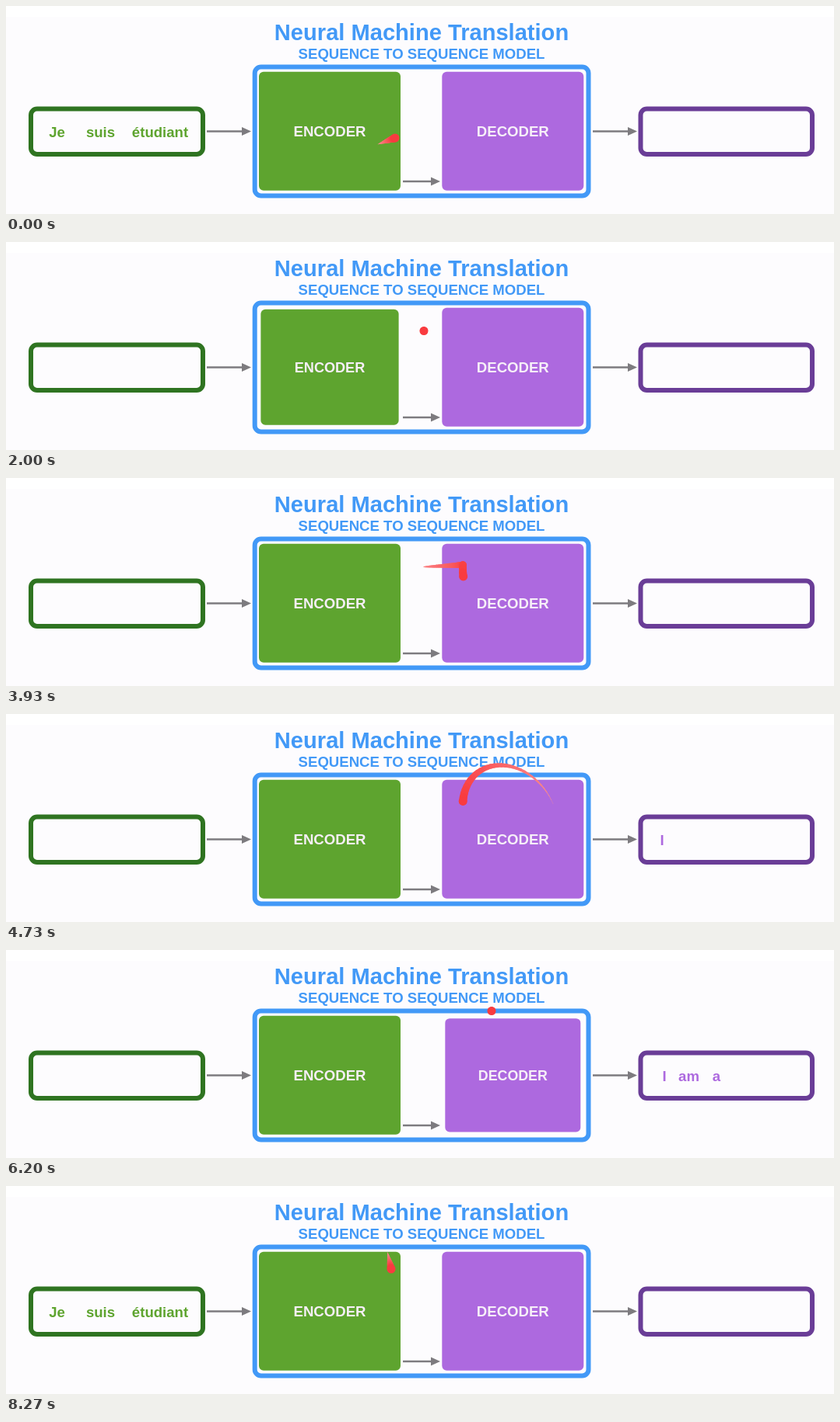
An HTML page with a canvas for the animation above (8340 ms loop, 1064 by 268 pixels).

```html
<!DOCTYPE html>
<html lang="en">
<head>
<meta charset="utf-8">
<title>Sequence to sequence model</title>
<style>
  html, body { margin: 0; width: 100%; height: 100%; overflow: hidden; background: #fff; }
  canvas { display: block; }
</style>
</head>
<body>
<canvas id="stage" width="1064" height="268"></canvas>
<script>
const ctx = document.getElementById('stage').getContext('2d');
const LOOP = 8340;
const BLUE = '#4299f7', GREEN = '#5ea42f', DARK_GREEN = '#2f7421';
const PURPLE = '#ad69df', DARK_PURPLE = '#6a3d97', ORANGE = '#f98a26', RED = '#f93b3f';

const clamp = v => Math.min(1, Math.max(0, v));
const progress = (t, start, length) => clamp((t - start) / length);
const mix = (a, b, p) => a + (b - a) * p;
const smooth = p => p * p * (3 - 2 * p);
const easeOut = p => 1 - (1 - p) ** 2;

function roundRect(x, y, w, h, r) {
  ctx.beginPath();
  ctx.roundRect(x, y, w, h, r);
}

function text(label, x, baseline, color, size = 18.6) {
  ctx.font = `bold ${size}px "Liberation Sans", Arial, sans-serif`;
  ctx.textAlign = 'center';
  ctx.fillStyle = color;
  ctx.fillText(label, x, baseline);
}

function frameBox(x, y, w, h, color) {
  roundRect(x, y, w, h, 8);
  ctx.strokeStyle = color;
  ctx.lineWidth = 6;
  ctx.stroke();
}

function arrow(x1, x2, y) {
  ctx.strokeStyle = ctx.fillStyle = '#7d7b7f';
  ctx.lineWidth = 2.6;
  ctx.beginPath();
  ctx.moveTo(x1, y);
  ctx.lineTo(x2 - 10, y);
  ctx.stroke();
  ctx.beginPath();
  ctx.moveTo(x2, y);
  ctx.lineTo(x2 - 12, y - 5.5);
  ctx.lineTo(x2 - 12, y + 5.5);
  ctx.fill();
}

// Scale of a block that shrinks briefly and recovers.
const pulse = (t, middle, half) =>
  1 - 0.044 * Math.cos(clamp(Math.abs(t - middle) / half) * Math.PI / 2) ** 2;

function block(label, centerX, color, scale) {
  ctx.save();
  ctx.translate(centerX, 161.3);
  ctx.scale(scale, scale);
  roundRect(-91, -76.5, 182, 153, 6);
  ctx.fillStyle = color;
  ctx.fill();
  text(label, 0, 6.5, '#f6eff8');
  ctx.restore();
}

function contextCard(t) {
  if (t < 2600 || t > 3600) return;
  const x = mix(486, 533.7, smooth(progress(t, 2600, 330))) + 60 * smooth(progress(t, 3200, 400));
  ctx.save();
  ctx.translate(x, 144);
  roundRect(-19.5, -59, 39, 118, 6);
  ctx.fillStyle = ORANGE;
  ctx.fill();
  ctx.rotate(Math.PI / 2);
  text('CONTEXT', 0, 6.5, '#fdeee0');
  ctx.restore();
}

function clipped(x, w, draw) {
  ctx.save();
  ctx.beginPath();
  ctx.rect(x, 130, w, 64);
  ctx.clip();
  draw();
  ctx.restore();
}

function inputWords(t) {
  const time = t >= 7470 ? 0 : t;
  [['Je', 65.5], ['suis', 121.5], ['étudiant', 198]].forEach(([word, x], i) => {
    const p = progress(time, 1070 + 100 * i, 330);
    if (p < 1) text(word, x + (290 - x) * p ** 1.9, 168.5, GREEN);
  });
}

function outputWords(t) {
  if (t >= 7470) return;
  [['I', 846], ['am', 877.5], ['a', 913], ['student', 970]].forEach(([word, x], i) => {
    const p = progress(t, 4510 + 600 * i, 290);
    if (p > 0) text(word, mix(795, x, easeOut(p)), 169, PURPLE);
  });
}

// Slightly skewed loop around the decoder label.
function circle(degrees) {
  const a = degrees * Math.PI / 180;
  return [648 + 61 * Math.cos(a), 131 - 65 * Math.sin(a - 0.21)];
}

// Laser pointer: rests, circles the decoder, rests, then drops over the encoder.
function pointer(t) {
  if (t < 1070) {
    const p = progress(t, -345, 345);
    return [mix(478, 500, p), mix(178, 170, p)];
  }
  if (t < 3900) {
    const p = smooth(progress(t, 3600, 300));
    const [x, y] = circle(175);
    return [mix(537, x, p), mix(114.5, y, p)];
  }
  if (t < 5350) {
    const [x, y] = circle(175 + 360 * (t - 3900) / 830);
    const p = smooth(progress(t, 5150, 200));
    return [mix(x, 624, p), mix(y, 78.5, p)];
  }
  const across = smooth(progress(t, 7500, 340));
  const down = progress(t, 7840, 430);
  return [mix(624, 489, across) + 6 * down, mix(78.5, 80, across) + 27 * down];
}

function laser(t) {
  const now = t < 1070 ? 0 : t;
  const earliest = t < 1070 ? -345 : 1070;
  const life = 345, steps = 32;
  const at = age => pointer(Math.max(earliest, now - age));
  ctx.lineCap = 'round';
  for (let i = steps; i > 0; i--) {
    const age = i / (steps + 1);
    ctx.strokeStyle = `hsl(359 94% ${60 + 18 * age}%)`;
    ctx.lineWidth = 10.5 * (1 - age);
    ctx.beginPath();
    ctx.moveTo(...at(life * i / steps));
    ctx.lineTo(...at(life * (i - 1) / steps));
    ctx.stroke();
  }
  ctx.lineCap = 'butt';
  ctx.fillStyle = RED;
  ctx.beginPath();
  ctx.arc(...at(0), 5.5, 0, 7);
  ctx.fill();
}

function draw(t) {
  ctx.fillStyle = '#fdfcfe';
  ctx.fillRect(0, 0, 1064, 268);
  ctx.fillStyle = '#fff';
  ctx.fillRect(0, 0, 1064, 14);

  text('Neural Machine Translation', 534, 44, BLUE, 29.1);
  text('SEQUENCE TO SEQUENCE MODEL', 534, 68, BLUE);

  clipped(32, 223, () => inputWords(t));
  clipped(815, 222, () => outputWords(t));
  frameBox(32, 132.5, 221, 58.5, DARK_GREEN);
  frameBox(815.5, 132.5, 220.5, 58.5, DARK_PURPLE);
  frameBox(319.7, 78.5, 428.8, 166, BLUE);

  arrow(258, 315, 161.5);
  arrow(754, 811, 161.5);
  arrow(510, 558, 226);

  contextCard(t);
  block('ENCODER', 416, GREEN, pulse(t, 1900, 230));
  const nearestBeat = 4400 + 600 * Math.min(3, Math.max(0, Math.round((t - 4400) / 600)));
  block('DECODER', 651.3, PURPLE, pulse(t, nearestBeat, 230));
  laser(t);
}

function tick() {
  draw(performance.now() % LOOP);
  requestAnimationFrame(tick);
}
tick();
</script>
</body>
</html>
```
